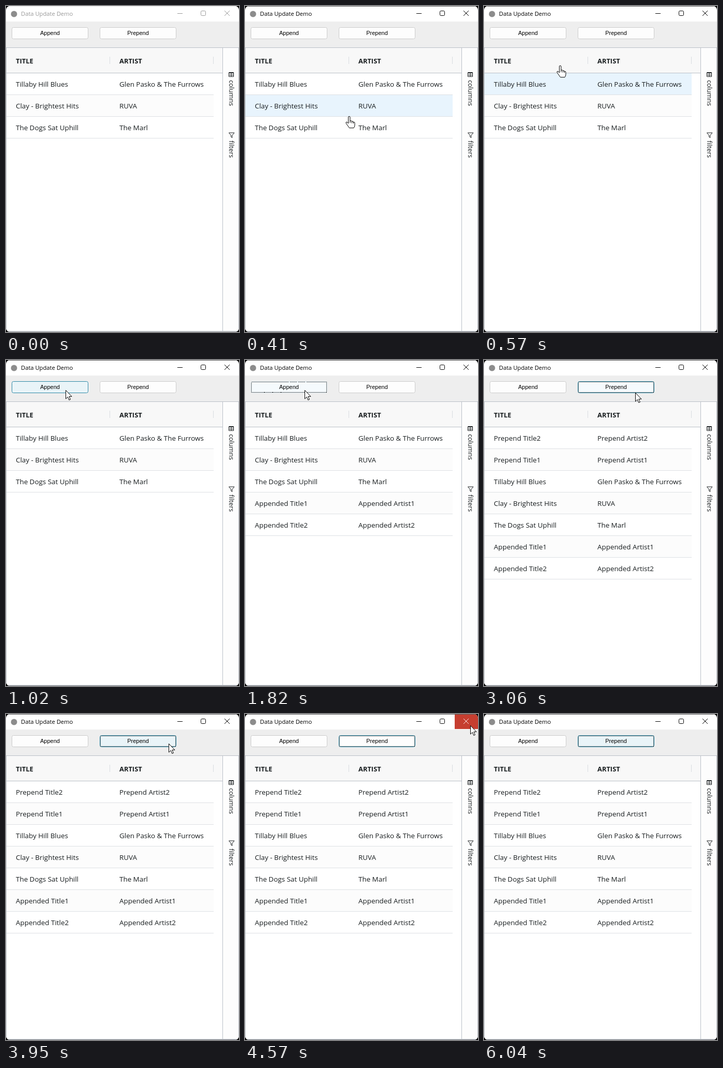
Write an HTML page that moves like this. It is 450 px wide and 630 px high and loops after 6200 ms.

```html
<!DOCTYPE html>
<html lang="en">
<head>
<meta charset="utf-8">
<title>Data Update Demo</title>
<style>
  html, body { margin: 0; width: 100%; height: 100%; overflow: hidden; background: #000; }
  svg { display: block; width: 450px; height: 630px; }
  text { font-family: "Open Sans", "Noto Sans", sans-serif; fill: #181d1f; white-space: pre; }
  .cell { font-size: 13.4px; }
  .head { font-size: 12.9px; font-weight: 700; }
  .tab { font-size: 12.6px; }
  .caption { font-size: 11.2px; fill: #000; }
  .label { font: 11px "Liberation Sans", Arial, sans-serif; fill: #000; text-anchor: middle; }
  .crisp { shape-rendering: crispEdges; }
</style>
</head>
<body>
<svg id="stage" viewBox="0 0 450 630"></svg>
<script>
const LOOP = 6200;
const LINE = '#babfc7', TEAL = '#2c88a6';
const stage = document.getElementById('stage');

const records = [
  ['Tillaby Hill Blues', 'Glen Pasko & The Furrows'],
  ['Clay - Brightest Hits', 'RUVA'],
  ['The Dogs Sat Uphill', 'The Marl']
];
const added = (word, n) => [`${word} Title${n}`, `${word} Artist${n}`];

const within = (t, a, b) => t >= a && t < b;
const rect = (x, y, w, h, fill, more = '') =>
  `<rect x="${x}" y="${y}" width="${w}" height="${h}" fill="${fill}" ${more}/>`;
const path = (d, stroke, more = '') => `<path d="${d}" fill="none" stroke="${stroke}" ${more}/>`;
const text = (x, y, cls, s, more = '') =>
  `<text x="${x}" y="${y}" class="${cls}" ${more}>${s.replace('&', '&amp;')}</text>`;

// The pointer is sampled in even steps along each move.
const smooth = u => u * u * (3 - 2 * u);
const moves = [
  { at: 410, till: 1020, steps: 8, from: [201, 213], to: [115, 58], ease: u => 1 - (1 - u) ** 3.45 },
  { at: 1820, till: 2354, steps: 7, from: [115, 58], to: [292, 63], ease: smooth },
  { at: 3790, till: 4410, steps: 8, from: [292, 63], to: [435, 22], ease: smooth }
];

function pointer(t) {
  if (!within(t, 410, 5340)) return null;
  const m = moves.filter(v => t >= v.at).pop();
  const k = Math.min(m.steps, Math.floor((t - m.at) / (m.till - m.at) * m.steps + .02));
  const s = m.ease(k / m.steps);
  return m.from.map((a, i) => a + (m.to[i] - a) * s);
}

function drawPointer(p) {
  if (!p) return '';
  const hand = 'M-1.5 13V2a1.7 1.7 0 0 1 3.4 0v7q3.2-1 3.6 1 2.6-.6 3 1.2 2.5-.2 2.5 2v4' +
    'q0 3-2 5.5H.5L-5.5 14q-1.5-2.5.5-3 1.5 0 3.5 3zM2 9v4M5.5 10v3.5M8.5 11v3';
  const arrow = 'M.5.5V17l3.8-3.6 2.5 6 2.6-1.1-2.5-5.8H12z';
  return `<path transform="translate(${p.map(Math.round)})" d="${p[1] > 110 ? hand : arrow}"
    fill="#fff" stroke="#000" stroke-linejoin="round"/>`;
}

function button(x, label, { fill, border, focus }) {
  return rect(x + .5, 41.5, 147, 22, fill, `rx="3" stroke="${border}"`) +
    (focus ? rect(x + 1.5, 42.5, 145, 20, 'none',
      'stroke="#000" stroke-dasharray="1 1" class="crisp"') : '') +
    text(x + 74, 56, 'label', label);
}

function buttons(t, p) {
  const over = x => p && p[1] < 64 && within(p[0], x, x + 148);
  const rest = '#fdfdfd', glow = '#e9f4f8', soft = '#f5fafd';
  const aHover = over(11), pHover = over(181);
  const aFlash = within(t, 1090, 1170) || within(t, 1820, 1900);
  const pFlash = within(t, 2510, 2750) || within(t, 2990, 3290);
  const aFocus = within(t, 1090, 2430), pFocus = t >= 2430;
  return button(11, 'Append', {
    fill: aFlash ? soft : aHover ? glow : rest,
    border: aFlash ? '#dbe8ee' : aHover || within(t, 1090, 2510) ? TEAL : '#cbcbcb',
    focus: aFocus
  }) + button(181, 'Prepend', {
    fill: pFlash ? soft : pHover || t >= 5340 ? glow : rest,
    border: pHover || pFocus ? TEAL : '#cbcbcb',
    focus: pFocus
  });
}

function titleBar(t) {
  const ink = t < 100 ? '#999' : t < 160 ? '#555' : '#000';
  const red = t < 4410 ? 0 : t < 4480 ? .5 : t < 4570 ? .85 : t < 5340 ? 1 : t < 5410 ? .4 : 0;
  return rect(0, 0, 450, 30, '#fff') +
    '<circle cx="15.5" cy="15.5" r="6" fill="#8c8c8c"/>' +
    text(29, 18.5, 'caption', 'Data Update Demo', `style="fill:${ink}"`) +
    rect(405, 0, 45, 29, '#c63e30', `opacity="${red}"`) +
    path('M331 14.5h10', ink) +
    rect(376.5, 9.5, 9, 9, 'none', `rx="2" stroke="${ink}"`) +
    path('M422 9l10 10m0-10l-10 10', red > .4 ? '#fbe9e7' : ink);
}

function rows(t) {
  const list = records.slice();
  if (t >= 1170) list.push(added('Appended', 1));
  if (t >= 1820) list.push(added('Appended', 2));
  if (t >= 2510) list.unshift(added('Prepend', 1));
  if (t >= 2990) list.unshift(added('Prepend', 2));
  const hover = within(t, 410, 480) ? 1 : within(t, 480, 640) ? 0 : -1;
  return list.map(([title, artist], i) => {
    const y = 130 + i * 42;
    const fill = i === hover ? '#e8f4fd' : i % 2 ? '#fcfcfc' : '#fff';
    return rect(1, y, 400, 41, fill) + rect(1, y + 41, 400, 1, '#dde0e4') +
      text(19, y + 26, 'cell', title) + text(219, y + 26, 'cell', artist);
  }).join('');
}

function gridFrame() {
  const dark = '#181d1f';
  return rect(0, 30, 450, 50, '#eee') +
    rect(0, 80, 450, 550, '#fff') +
    rect(1, 81, 417, 48, '#f8f8f8') +
    rect(419, 81, 30, 547, '#fdfdfd') +
    rect(0, 80, 450, 1, LINE) + rect(0, 129, 418, 1, LINE) +
    rect(418, 81, 1, 547, LINE) + rect(0, 628, 450, 1, LINE) +
    rect(0, 81, 1, 547, LINE) + rect(449, 81, 1, 547, LINE) +
    rect(200, 98, 1, 14, '#d9dce1') + rect(400, 98, 1, 14, '#d9dce1') +
    text(19, 111, 'head', 'TITLE') + text(219, 111, 'head', 'ARTIST') +
    path('M430.5 128.5h9v8h-9zM430 129.5h10M431 133.5h9M435 130v7', dark) +
    path('M430.5 245h10.5l-4.2 5v4.5l-2.2-1.5v-3z', dark, 'stroke-linejoin="round"') +
    text(0, 0, 'tab', 'columns', 'transform="translate(430.5 143.2) rotate(90)"') +
    text(0, 0, 'tab', 'filters', 'transform="translate(430.5 260) rotate(90)"');
}

stage.innerHTML = '<clipPath id="win"><rect width="450" height="630" rx="8"/></clipPath>' +
  '<rect width="450" height="630"/>' +
  `<g clip-path="url(#win)">${gridFrame()}<g id="live"></g></g>`;
const live = document.getElementById('live');

function render(t) {
  const p = pointer(t);
  const [top, bottom] = t < 100 ? ['#e4e4e4', '#b4b4b4'] : ['#5a5a5a', '#8a8d91'];
  live.innerHTML = titleBar(t) + buttons(t, p) + rows(t) +
    rect(0, 0, 450, 1, top) + rect(0, 629, 450, 1, bottom) + drawPointer(p);
}

const start = performance.now();
function tick() {
  render((performance.now() - start) % LOOP);
  requestAnimationFrame(tick);
}
tick();
</script>
</body>
</html>
```
